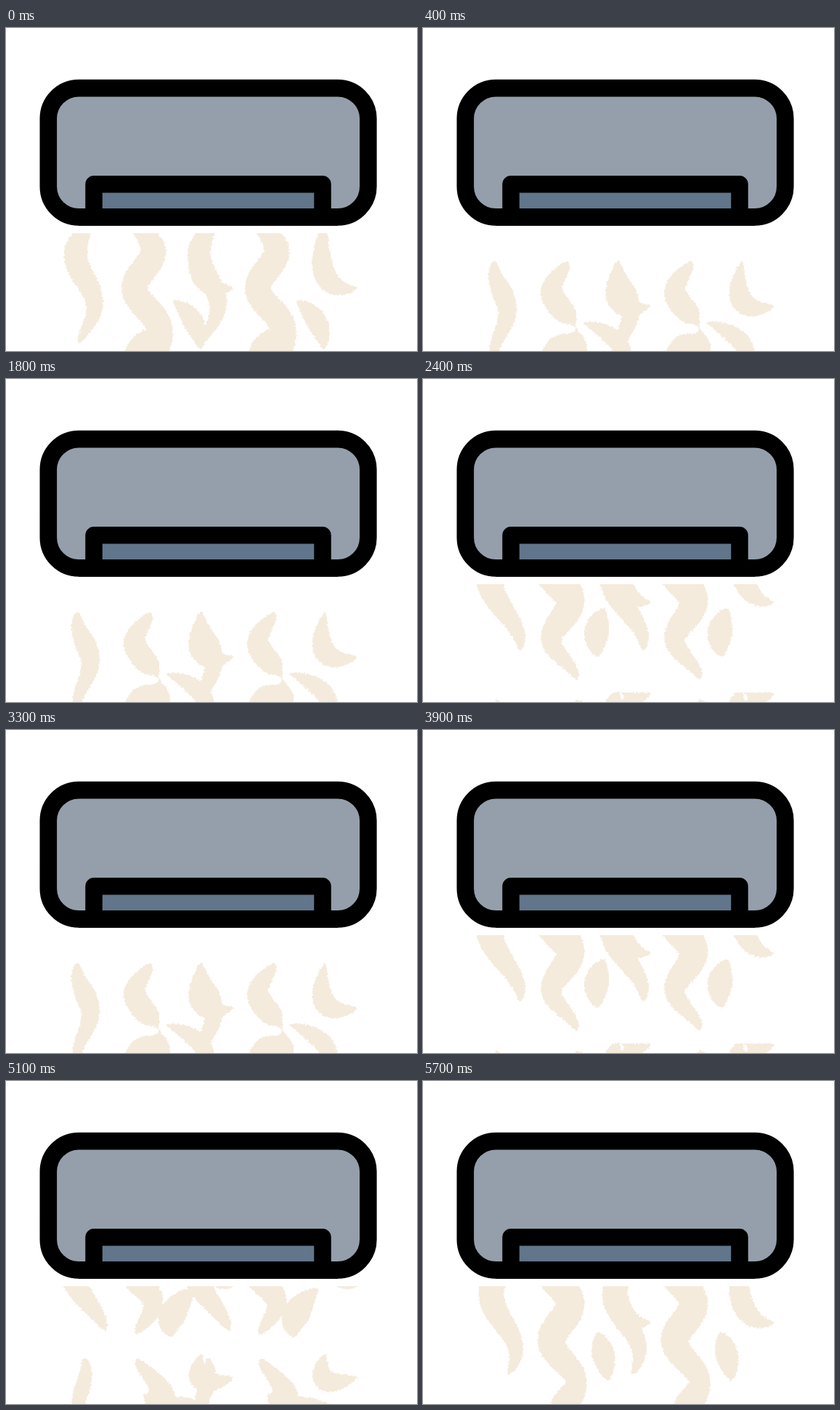
Animation of 566x444 px, one loop 6 s. Source, as an HTML page:

```html
<!DOCTYPE html>
<html lang="en">
<head>
<meta charset="utf-8">
<title>Air conditioner</title>
<style>
  html, body { margin: 0; width: 100%; height: 100%; overflow: hidden; background: #fff; }
  svg { display: block; width: 566px; height: 444px; }
</style>
</head>
<body>
<svg viewBox="0 0 566 444">
  <defs>
    <clipPath id="below"><rect x="62" y="282" width="423" height="162"/></clipPath>
    <filter id="grain" filterUnits="userSpaceOnUse" x="50" y="262" width="450" height="200" color-interpolation-filters="sRGB">
      <feTurbulence type="fractalNoise" baseFrequency="0.35" numOctaves="2" seed="4"/>
      <feDisplacementMap in="SourceGraphic" scale="5" xChannelSelector="R" yChannelSelector="G"/>
      <feGaussianBlur stdDeviation="0.7"/>
    </filter>
  </defs>
  <rect x="58.3" y="82.6" width="440.5" height="177.3" rx="42" fill="#959fab" stroke="#000" stroke-width="23.6"/>
  <path d="M121 260V214.7H436V260" fill="#61758b" stroke="#000" stroke-width="23.5" stroke-linejoin="round"/>
  <path d="M100 259.9H457" stroke="#000" stroke-width="23.6"/>
  <g clip-path="url(#below)"><g id="air" fill="#f4ebdd"></g></g>
</svg>
<script>
const STEP = 300, PHASES = 5, TILE = 170, SAMPLES = 48;

const clamp = v => Math.max(0, Math.min(1, v));
const wave = (y, crest, length) => Math.cos(2 * Math.PI * (y - crest) / length);

// Closed outline around spine(s), s from 0 to 1, with the given width(s).
function ribbon(spine, width) {
  const left = [], right = [];
  for (let i = 0; i <= SAMPLES; i++) {
    const s = i / SAMPLES;
    const [x, y] = spine(s), [x0, y0] = spine(s - 0.01), [x1, y1] = spine(s + 0.01);
    const half = width(s) / 2 / Math.hypot(x1 - x0, y1 - y0);
    const nx = (y1 - y0) * half, ny = (x0 - x1) * half;
    left.push([x - nx, y - ny]);
    right.unshift([x + nx, y + ny]);
  }
  return 'M' + [...left, ...right].join('L') + 'Z';
}

// Wavy band from top to bottom, thinning towards both ends.
function band(top, bottom, tail, centre, width) {
  const yAt = s => top + (bottom - top) * s;
  return ribbon(s => [centre(yAt(s)), yAt(s)], s => {
    const y = yAt(s);
    return width(y) * Math.sqrt(clamp((y - top) / 45) * clamp((bottom - y) / tail));
  });
}

// Curved sliver with pointed ends along a quadratic curve.
function crescent(from, bend, to, width) {
  const mix = (s, k) => (1 - s) ** 2 * from[k] + 2 * s * (1 - s) * bend[k] + s * s * to[k];
  return ribbon(s => [mix(s, 0), mix(s, 1)], s => width * Math.sin(Math.PI * s) ** 0.7);
}

function drop(x, y, rx, ry) {
  return ribbon(s => [x, y - ry * Math.cos(Math.PI * s)], s => 2 * rx * Math.sin(Math.PI * s));
}

// One puff of air; it falls, thins and lets go of the vent as it ages.
function puff(age) {
  const top = 140 + 60 * age;
  const waist = y => 1 - clamp(age - 2) * Math.exp(-(((y - 262 - 50 * age) / 12) ** 2));
  const flare = y => 1 + 0.8 * clamp((y - 415) / 30);
  const fall = age - 3;
  const shapes = [
    band(top, 374 + 30 * age, 100,
      y => 113 - 2 * age - (21 - 4 * age) * wave(y, 275 + 18 * age, 180 - 20 * age),
      () => 38 - 3 * age),
    band(top, 414 + 65 * age, 130,
      y => 192 + 0.08 * (y - 360) + 15 * wave(y, 305 + 4 * Math.max(0, age - 2) ** 2, 108),
      y => (44 - 4 * age) * waist(y) * flare(y)),
    crescent([270, 320 + 55 * fall], [248, 400 + 30 * fall], [314, 382 + 25 * fall], 30),
    crescent([250 - 10 * age, 315 + 30 * age], [232 + 17 * age, 348 + 25 * age],
      [242 + 13 * age, 382 + 30 * age], 34 - 3 * age),
    drop(96 - 8 * age, 364 + 25 * age, 14 - 1.5 * age, 15 - 1.5 * age)
  ];
  if (age < 4) shapes.push(drop(153, 286 + 20 * age, 17 - 4 * age, 20 - 4 * age));
  return shapes;
}

function add(parent, name, attrs) {
  const el = document.createElementNS('http://www.w3.org/2000/svg', name);
  for (const key in attrs) el.setAttribute(key, attrs[key]);
  return parent.appendChild(el);
}

const air = document.getElementById('air');
for (let phase = 0; phase < PHASES; phase++) {
  const group = add(air, 'g', { filter: 'url(#grain)' });
  const age = (phase + 2) % PHASES;
  // The next puff starts one step before the old one has gone.
  for (const a of [age, age - PHASES, age + PHASES].filter(a => a >= -1 && a <= 5)) {
    for (const d of puff(a)) {
      add(group, 'path', { d });
      add(group, 'path', { d, transform: `translate(${TILE})` });
    }
  }
  group.animate([
    { opacity: 1, easing: 'step-end' },
    { opacity: 0, offset: 1 / PHASES, easing: 'step-end' },
    { opacity: 0 }
  ], { duration: STEP * PHASES, iterations: Infinity, delay: (phase - PHASES) * STEP });
}
</script>
</body>
</html>
```
